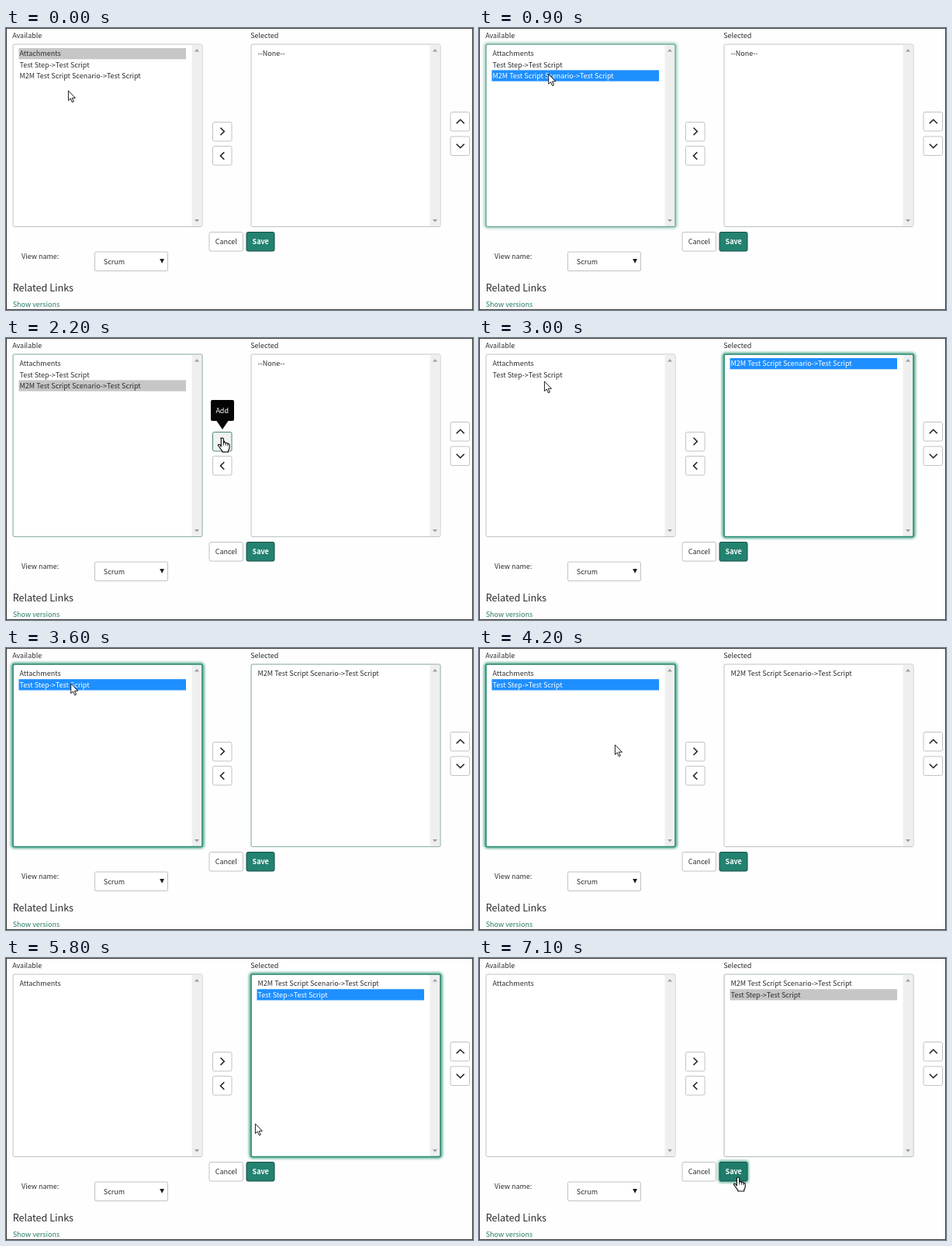
These frames come from a looping animation (602x364 px, 7.2 s). An HTML page:

```html
<!DOCTYPE html>
<html lang="en">
<head>
<meta charset="utf-8">
<title>List picker</title>
<style>
html, body { margin: 0; width: 100%; height: 100%; overflow: hidden; background: #fff; }
svg { display: block; width: 602px; height: 364px; }
text { font: 9px "Noto Sans CJK SC", "Noto Sans CJK JP", "Noto Sans CJK", "Open Sans", sans-serif; fill: #2b2d30; white-space: pre; }
.mid { font-weight: 500; }
.bold { font-weight: 600; }
.c { text-anchor: middle; }
.box { fill: #fff; stroke: #bfc2c5; }
.chev { fill: none; stroke: #222; stroke-width: 1.6; }
</style>
</head>
<body>
<svg viewBox="0 0 602 364">
  <defs>
    <filter id="soft" x="-10%" y="-10%" width="120%" height="120%"><feGaussianBlur stdDeviation="1.7"/></filter>
  </defs>
  <rect width="602" height="364" fill="#fefefe"/>
  <g id="stage"></g>
  <rect x=".5" y=".5" width="601" height="363" fill="none" stroke="#3a3a3a"/>
  <g id="tip">
    <path d="M266 80H292Q294 80 294 82V105Q294 107 292 107H286.5L279 118L271.500 107H266Q264 107 264 105V82Q264 80 266 80Z" fill="#050505"/>
    <text class="c mid" x="278.700" y="96.700" style="fill:#fff">Add</text>
  </g>
  <g id="cursor" stroke="#111" stroke-linejoin="round" stroke-linecap="round">
    <path id="arrow" fill="#fff" stroke-width=".95" d="M.4 .3V12.600L3.200 10L5.300 14.900L7.300 14L5.200 9.300H9Z"/>
    <g id="hand">
      <path fill="#fff" stroke-width="1.150" d="M-1.600 11V1.600Q-1.600 0 0 0Q1.600 0 1.600 1.600V6.500Q1.700 5.300 3 5.400Q4.200 5.500 4.300 7Q4.600 6 5.700 6.200Q6.800 6.400 6.900 7.800Q7.300 7 8.200 7.400Q9.200 7.800 9.200 9.200V12.500Q9 14.500 7.700 16V18H-.2V16.500Q-2.500 14.300-3.600 12Q-4.600 10.500-5.500 9.500Q-5.700 8.200-4.400 8.100Q-3 8.300-1.600 11Z"/>
      <path fill="none" stroke-width=".8" d="M1.600 6.500V9.200M4.300 7V9.500M6.900 7.800V10"/>
    </g>
  </g>
</svg>
<script>
const NS = "http://www.w3.org/2000/svg";
const LOOP = 7200, STEP = 100, ROW = 14.2;
const $ = id => document.getElementById(id);
const stage = $("stage");

function add(tag, attrs, content) {
  const el = document.createElementNS(NS, tag);
  for (const k in attrs) el.setAttribute(k, attrs[k]);
  if (content) el.textContent = content;
  stage.append(el);
  return el;
}
const label = (x, y, s, cls = "", style = "") => add("text", { x, y, class: cls, style }, s);
const box = (x, y, width, height, rx = 2, cls = "box") => add("rect", { x, y, width, height, rx, class: cls });
const show = (el, on) => { el.style.display = on ? "" : "none"; };

function makeList(x, title) {
  label(x - .3, 12.8, title, "mid");
  const glow = add("rect", { x: x - .5, y: 20.5, width: 246, height: 236.5, rx: 3,
    fill: "none", stroke: "#2f9a7c", "stroke-width": 4, filter: "url(#soft)" });
  box(x + .5, 21, 244, 235.5);
  add("rect", { x: x + 231, y: 21.5, width: 13, height: 234.5, fill: "#efeff0" });
  const mid = x + 237.5;
  add("path", { d: `M${mid - 3} 30.500h6l-3-3.500zM${mid - 3} 247h6l-3 3.500z`, fill: "#9b9da0" });
  const edge = add("rect", { x: x + .5, y: 21, width: 244, height: 235.5, rx: 2,
    fill: "none", stroke: "#2a8a70" });
  const bar = add("rect", { x: x + 8, width: 215.5, height: 14.3 });
  const rows = [0, 1, 2].map(i => label(x + 9, 36.4 + i * ROW, ""));
  return (items, picked, focus, warm) => {
    rows.forEach((row, i) => {
      row.textContent = items[i] || "";
      const lit = i === picked && focus > 0;
      row.style.fill = lit ? "#fff" : "";
      row.style.fontWeight = lit ? 500 : 400;
    });
    show(bar, picked >= 0);
    bar.setAttribute("y", 26 + Math.max(picked, 0) * ROW);
    bar.setAttribute("fill", focus > 0 ? "#1e8fff" : "#c6c6c6");
    glow.style.opacity = focus * .75;
    edge.style.opacity = Math.max(focus, warm);
    edge.setAttribute("stroke-width", focus > 0 ? 1.6 : 1);
  };
}

function makeButton(x, y, chevron) {
  const el = box(x + .5, y + .5, 24.5, 24.5);
  add("path", { d: chevron, class: "chev" });
  return el;
}

const left = makeList(8.5, "Available");
const right = makeList(315.5, "Selected");

const addBtn = makeButton(266, 121, "M276.500 128.700l4.800 4.800l-4.800 4.800");
makeButton(266, 152, "M281.300 160.200l-4.800 4.800l4.800 4.800");
makeButton(572.500, 108, "M580.700 123.300l5-5l5 5");
makeButton(572.500, 139.500, "M580.700 149.700l5 5l5-5");

box(262, 263.5, 43.5, 24.5);
label(283.8, 279.2, "Cancel", "c");
const saveGlow = add("rect", { x: 309.5, y: 262.5, width: 37, height: 26.5, rx: 3,
  fill: "none", stroke: "#2f9a7c", "stroke-width": 3, filter: "url(#soft)" });
const saveBtn = add("rect", { x: 310, y: 263.5, width: 36, height: 24.5, rx: 2, stroke: "#174f46" });
label(328.2, 279.2, "Save", "c bold", "fill:#fff");

label(20, 298.3, "View name:");
box(114.5, 289, 94, 24.5, 1.5);
label(125.8, 304.6, "Scrum");
add("path", { d: "M198.200 298h5.800l-2.900 5.800z", fill: "#1c1c1c" });
label(8.7, 340.3, "Related Links", "", "font-size:12.600px");
label(8.7, 360, "Show versions", "", "fill:#277a66");

// pointer stops: time, x, y
const path = [
  [0, 80, 81], [300, 82, 78], [800, 89, 60], [1100, 90, 59], [1400, 282, 153],
  [1600, 278, 131], [2300, 279, 129], [2500, 262, 124], [3000, 84, 56],
  [3300, 82, 46], [3800, 84, 46], [4200, 175, 125], [4700, 277, 131],
  [5300, 279, 130], [5800, 321, 214], [6400, 331, 276], [6800, 334, 283], [7200, 334, 283]
];

function pointer(t) {
  const i = Math.max(1, path.findIndex(p => p[0] > t));
  const [t0, x0, y0] = path[i - 1], [t1, x1, y1] = path[i];
  const u = (t - t0) / (t1 - t0), e = u * u * (3 - 2 * u);
  return [x0 + (x1 - x0) * e, y0 + (y1 - y0) * e];
}

const inside = (x, y, l, t, r, b) => x >= l && x <= r && y >= t && y <= b;
const within = (t, a, b) => t >= a && t < b;
// focus ring eases in over 200 ms
const ring = (t, a, b) => within(t, a, b) ? Math.min(1, (t - a + 100) / 200) : 0;
const fade = (t, end) => within(t, end, end + 200) ? .6 * (1 - (t - end) / 250) : 0;

const FILES = "Attachments", STEPS = "Test Step->Test Script",
  SCENE = "M2M Test Script Scenario->Test Script";

function draw(t) {
  const moved1 = t >= 2300, moved2 = t >= 5300;

  left(moved2 ? [FILES] : moved1 ? [FILES, STEPS] : [FILES, STEPS, SCENE],
    t < 900 ? 0 : !moved1 ? 2 : within(t, 3500, 5300) ? 1 : -1,
    ring(t, 900, 2100) + ring(t, 3500, 5200),
    Math.max(fade(t, 2100), fade(t, 5200)));

  right(moved2 ? [SCENE, STEPS] : moved1 ? [SCENE] : ["--None--"],
    moved2 ? 1 : within(t, 2300, 3500) ? 0 : -1,
    ring(t, 2300, 3500) + ring(t, 5300, 7000),
    Math.max(fade(t, 3500), t >= 7000 ? fade(t, 7000) * .3 : 0));

  const [x, y] = pointer(t);
  const onAdd = inside(x, y, 266, 121, 291, 146);
  const onRemove = inside(x, y, 266, 152, 291, 177);
  const onSave = inside(x, y, 310, 263, 346, 288);
  const pressed = within(t, 2100, 2300) || within(t, 5200, 5300);
  addBtn.style.fill = pressed ? "#f1f3f3" : onAdd ? "#f8f8f8" : "";
  addBtn.style.stroke = pressed ? "#4b8478" : "";
  saveBtn.setAttribute("fill", onSave ? "#1f7c6a" : "#238270");
  saveGlow.style.opacity = t >= 7000 ? .7 : 0;

  show($("tip"), within(t, 1700, 2400) || within(t, 4800, 5400));
  const hand = onAdd || onRemove || onSave;
  show($("hand"), hand);
  show($("arrow"), !hand);
  $("cursor").setAttribute("transform", `translate(${x.toFixed(1)} ${y.toFixed(1)})`);
}

const start = performance.now();
function tick() {
  const t = (performance.now() - start) % LOOP;
  draw(Math.floor(t / STEP) * STEP);
  requestAnimationFrame(tick);
}
tick();
</script>
</body>
</html>
```
